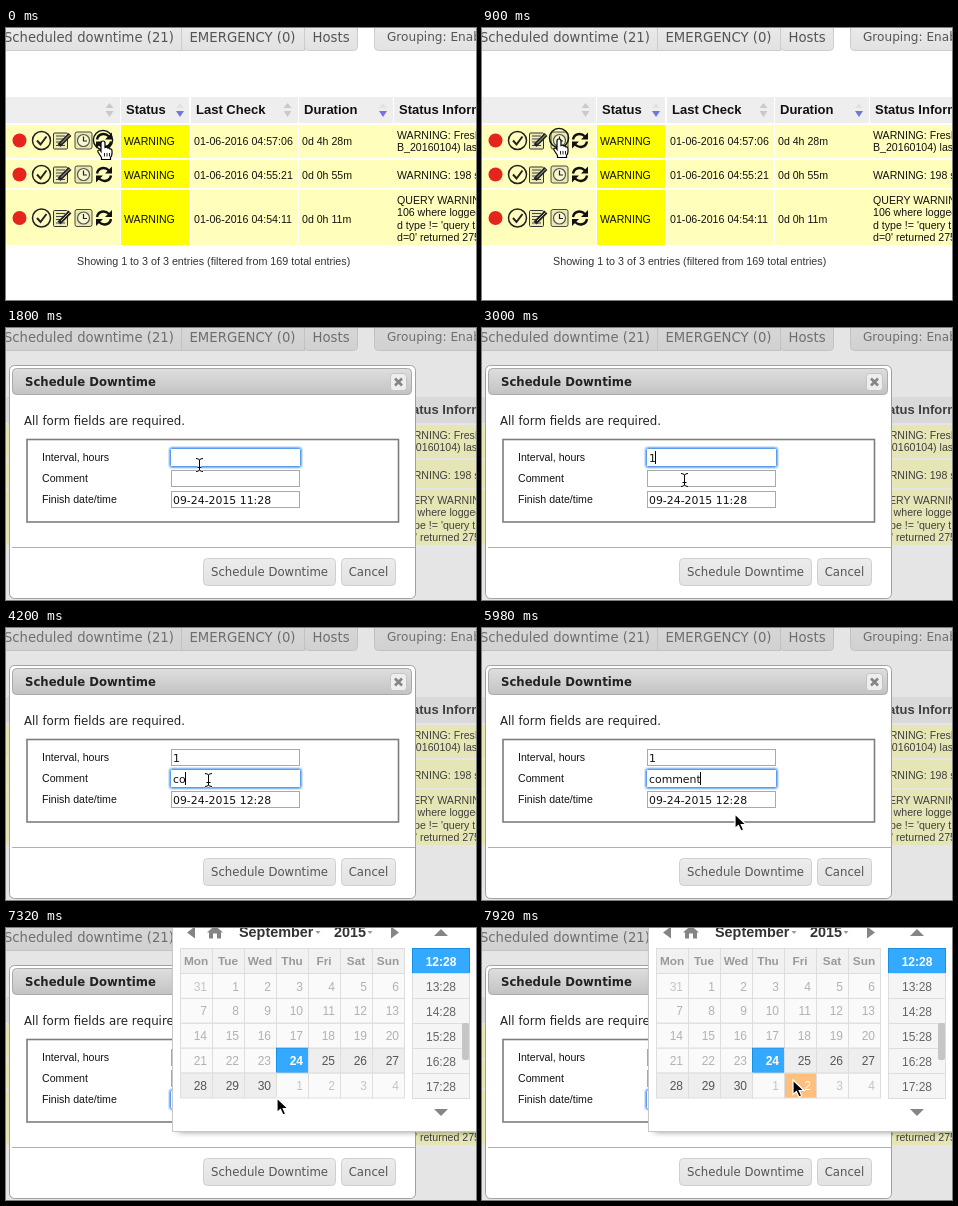
Animation of 470 by 272 pixels, one loop 8 s. Source, as an HTML page:

```html
<!DOCTYPE html>
<html lang="en">
<head>
<meta charset="utf-8">
<title>Schedule downtime</title>
<style>
html, body { margin: 0; width: 100%; height: 100%; overflow: hidden; background: #fff; }
svg { display: block; width: 470px; height: 272px; }
text { white-space: pre; }
.v { font-family: "DejaVu Sans", Verdana, sans-serif; }
.a { font-family: "Liberation Sans", Arial, sans-serif; }
.b { font-weight: bold; }
</style>
</head>
<body>
<svg id="stage" viewBox="0 0 470 272" xmlns="http://www.w3.org/2000/svg"></svg>
<script>
const LOOP = 8000;
const stage = document.getElementById('stage');

const rect = (x, y, w, h, fill, more = '') =>
  `<rect x="${x}" y="${y}" width="${w}" height="${h}" fill="${fill}" ${more}/>`;
const box = (x, y, w, h, fill, line, r = 0) =>
  rect(x + .5, y + .5, w - 1, h - 1, fill, `stroke="${line}" rx="${r}"`);
const path = (d, fill, more = '') => `<path d="${d}" fill="${fill}" ${more}/>`;
const text = (x, y, s, size, cls = 'a', fill = '#111', more = '') =>
  `<text x="${x}" y="${y}" font-size="${size}" class="${cls}" fill="${fill}" ${more}>${s}</text>`;
const group = (id, body, more = '') => `<g id="${id}" ${more}>${body}</g>`;
const at = (x, y, body) => `<g transform="translate(${x} ${y})">${body}</g>`;
const line = (d, w = 1, color = '#222') => path(d, 'none', `stroke="${color}" stroke-width="${w}"`);

const defs = `<defs>
  <linearGradient id="tab" x2="0" y2="1"><stop stop-color="#ececec"/><stop offset="1" stop-color="#e2e2e2"/></linearGradient>
  <linearGradient id="bar" x2="0" y2="1"><stop stop-color="#dedede"/><stop offset="1" stop-color="#c3c3c3"/></linearGradient>
  <filter id="blur" x="-10%" y="-10%" width="120%" height="120%"><feGaussianBlur stdDeviation="3.5"/></filter>
</defs>`;

// Page

function tabs() {
  const tab = (x, w, r) => box(x, -10, w, 33, 'url(#tab)', '#cdcdcd', r);
  return tab(-10, 186, 0) + tab(298, 54, 4) + tab(175, 124, 0) + tab(368, 130, 4) +
    text(-2, 14, 'Scheduled downtime (21)', 13.2, 'v', '#555') +
    text(183.5, 14, 'EMERGENCY (0)', 13.25, 'v', '#555') +
    text(306.5, 14, 'Hosts', 13.25, 'v', '#555') +
    text(381, 13, 'Grouping: Enabled', 12.1, 'v', '#555');
}

function sorter(x, y, active) {
  return path(`M${x - 4} ${y - 2}h8l-4 -5z`, active ? '#e2e2e2' : '#c9c9c9') +
    path(`M${x - 4} ${y + 1}h8l-4 6z`, active ? '#7474e0' : '#c9c9c9');
}

const arrows = (() => {
  const half = line('M-7 -1C-6 -7 1 -8 5 -4', 2.4, '#111') + path('M8 -8V-1H1z', '#111');
  return half + `<g transform="rotate(180)">${half}</g>`;
})();

function icons(y) {
  const check = `<circle r="9" fill="none" stroke="#222" stroke-width="1.5"/>` + line('M-4.5 0L-1 4L5 -4', 2);
  const note = box(-9, -8, 15, 17, '#eeeeb4', '#333', 1) +
    line('M-6 -4.5H3M-6 -1.5H2M-6 1.5H0M-6 5H3', 1.2, '#444') +
    line('M-3 5L8 -6', 4) + line('M-1 3L7.5 -5.5', 1, '#bbb');
  const clock = box(-9, -9, 18, 18, '#e9e9b4', '#4a4a40', 2) +
    `<circle r="6" fill="#f8f8d2" stroke="#55554a" stroke-width="1.2"/>` + line('M0 -4V.5H3.5', 1.2);
  return at(13.5, y, '<circle r="7" fill="#e3251d"/>') + at(35.5, y, check) +
    at(56, y, note) + at(77.5, y, clock) + at(98, y, arrows);
}

const cols = [[-2, 116], [115, 68], [185, 107], [293, 94], [388, 84]];
const rows = [
  { y: 97, h: 33, mid: 112.5, when: '01-06-2016 04:57:06', span: '0d 4h 28m',
    info: ['WARNING: Fresh', 'B_20160104) last'] },
  { y: 132, h: 28, mid: 146.5, when: '01-06-2016 04:55:21', span: '0d 0h 55m',
    info: ['WARNING: 198 s'] },
  { y: 162, h: 55, mid: 190, when: '01-06-2016 04:54:11', span: '0d 0h 11m',
    info: ['QUERY WARNING', '106 where logged', "d type != 'query t", "d=0' returned 275"] }
];

function table() {
  let out = cols.map(([x, w]) => rect(x, 69, w, 26, '#eeeeee')).join('');
  [['Status', 120], ['Last Check', 190], ['Duration', 298], ['Status Information', 393]]
    .forEach(([s, x]) => out += text(x, 86, s, 13, 'a b'));
  out += sorter(103.5, 82) + sorter(174, 82, true) + sorter(281.5, 82) + sorter(377, 82, true);
  for (const r of rows) {
    cols.forEach(([x, w], i) => out += rect(x, r.y, w, r.h, i === 1 ? '#ffff00' : '#ffffbb'));
    const base = r.mid + 4.5;
    out += icons(r.mid) + text(118, base, 'WARNING', 10.6) +
      text(188, base, r.when, 10.65) + text(296, base, r.span, 10.6);
    r.info.forEach((s, i) =>
      out += text(391, base + (i - (r.info.length - 1) / 2) * 12.2, s, 10.6));
  }
  return out + text(71, 237, 'Showing 1 to 3 of 3 entries (filtered from 169 total entries)', 10.74, 'a', '#333');
}

// Dialog

const fieldY = [121, 142, 163];

function glow() {
  return ['#d5e6fc', '#8fbdf6', '#5a9df0'].map((c, i) =>
    rect(162.5 + i, i - 2.5, 134 - 2 * i, 22 - 2 * i, '#fff', `stroke="${c}" rx="${3 - i}"`)).join('');
}

function dialog() {
  const button = (x, w, s) => box(x, 230, w, 28, 'url(#tab)', '#cfcfcf', 4) +
    text(x + w / 2, 248, s, 11.7, 'v', '#555', 'text-anchor="middle"');
  const labels = ['Interval, hours', 'Comment', 'Finish date/time'];
  return box(3, 37, 407, 234, '#fff', '#a0a0a0', 5) +
    box(6, 40, 400, 27, 'url(#bar)', '#aaa', 4) +
    text(19, 58, 'Schedule Downtime', 11.7, 'v b', '#222') +
    box(384, 45, 17, 18, '#eeeeee', '#c4c4c4', 3) +
    line('M389 50.5L396 57.5M396 50.5L389 57.5', 2.6, '#858585') +
    text(18, 97, 'All form fields are required.', 11.8, 'v', '#222') +
    rect(21, 111.5, 371.5, 82.5, 'none', 'stroke="#7d7d7d" stroke-width="1.6"') +
    labels.map((s, i) => text(36, fieldY[i] + 12, s, 10.6)).join('') +
    fieldY.map(y => box(165, y, 129, 17, '#fff', '#a9a9a9')).join('') +
    group('ring', glow()) +
    fieldY.map((y, i) => `<text id="in${i}" x="167" y="${y + 13}" font-size="10.9" class="v" fill="#111"></text>`).join('') +
    '<rect id="caret" width="1" height="13" fill="#000"/>' +
    line('M6 219.5H409', 1, '#b0b0b0') +
    button(197, 133, 'Schedule Downtime') + button(335, 55, 'Cancel');
}

// Date picker

const CELL = 32, ROW = 24.9, LEFT = 174, TOP = 45.5;

function picker() {
  let out = rect(172, -20, 310, 223, '#000', 'filter="url(#blur)" opacity=".55"') +
    box(166, -10, 320, 214, '#fff', '#c8c8c8') +
    path('M181 4.5l8 -6v12z', '#858585') + path('M385 -1.5v12l8 -6z', '#858585') +
    path('M201 4.5l8 -7 8 7h-2v6h-4v-5h-4v5h-4v-6z', '#858585') +
    text(233, 9, 'September', 14.4, 'a b', '#333') + path('M309.5 3h5l-2.5 3z', '#999') +
    text(328, 9, '2015', 14.4, 'a b', '#333') + path('M361.5 3h5l-2.5 3z', '#999');
  'Mon Tue Wed Thu Fri Sat Sun'.split(' ').forEach((s, i) => {
    out += rect(LEFT + i * CELL + .5, 20.5, CELL, 25, '#f1f1f1', 'stroke="#ddd"') +
      text(LEFT + (i + .5) * CELL, 37, s, 11.8, 'a b', '#999', 'text-anchor="middle"');
  });
  for (let i = 0; i < 35; i++) {
    const x = LEFT + i % 7 * CELL, y = TOP + Math.floor(i / 7) * ROW;
    const day = i === 0 ? 31 : i > 30 ? i - 30 : i;
    const now = i === 24, live = i > 24 && i <= 30;
    const ink = now ? '#fff' : live ? '#555' : i === 0 || i > 30 ? '#c4c4c4' : '#b2b2b2';
    out += rect(x + .5, y, CELL, ROW, now ? '#33aaff' : live ? '#eeeeee' : '#fafafa',
      `stroke="${now ? '#178fe5' : '#ddd'}" id="bg${i}"`) +
      text(x + 27, y + 17, day, 12, now ? 'a b' : 'a', ink, `text-anchor="end" id="day${i}"`);
  }
  out += path('M428 8l7 -7 7 7z', '#858585') + path('M428 181l7 7 7 -7z', '#858585');
  for (let i = 0; i < 6; i++) {
    const y = 20.5 + i * 25;
    out += rect(406.5, y, 57, 25, i ? '#f5f5f5' : '#33aaff', `stroke="${i ? '#ddd' : '#178fe5'}"`) +
      text(435, y + 17, `${12 + i}:28`, 12, i ? 'a' : 'a b', i ? '#666' : '#fff', 'text-anchor="middle"');
  }
  return out + rect(456, 95, 7, 37, '#c6c6c6', 'rx="2"');
}

// Pointers, each drawn with its hot spot at the origin

const beam = 'M-3 -6.5Q.5 -6.5 .5 -4.5Q.5 -6.5 4 -6.5M.5 -5V5M-3 6.5Q.5 6.5 .5 4.5Q.5 6.5 4 6.5M-1.5 2.5H2.5';
const pointers =
  group('press', '<circle r="9.6" fill="none" stroke="#111" stroke-width="1.4"/>') +
  group('arrow', path('M0 0V14.5L3.4 11.5L6 17L8.6 15.8L6.2 10.5H11z', '#000', 'stroke="#fff" stroke-width="1.2"')) +
  group('hand', at(0, 1.5, path('M-2 1.5Q-2 -.5 0 -.5Q2 -.5 2 1.5V6Q3.5 5 4.7 6.5Q6.2 6 7 7.5Q9 7.2 9 9.5V12Q9 14 7.5 16V18H-1.5V16Q-3.5 13 -5 10.5Q-5.5 8.5 -4 8.5Q-3 8.5 -2 10z',
    '#fff', 'stroke="#000" stroke-width="1.2"') + line('M1.5 11.5V15M4 11.5V15M6.5 11.5V15', 1))) +
  group('beam', line(beam, 2, '#fff') + line(beam, 1, '#000'));

stage.innerHTML = defs + rect(0, 0, 470, 272, '#fff') + tabs() + table() +
  group('modal', rect(0, 0, 470, 272, '#aaa', 'opacity=".3"') + dialog()) +
  group('picker', picker()) + pointers;

const $ = id => document.getElementById(id);
const show = (id, on) => $(id).setAttribute('display', on ? 'inline' : 'none');
const move = (id, x, y) => $(id).setAttribute('transform', `translate(${x} ${y})`);
const latest = (list, t) => list.filter(k => k[0] <= t).pop();

function glide(start, steps, from, to, via) {
  const mid = via || [(from[0] + to[0]) / 2, (from[1] + to[1]) / 2];
  return Array.from({ length: steps }, (_, i) => {
    const p = (i + 1) / steps, e = p * p * (3 - 2 * p), q = 1 - e;
    const spot = k => Math.round(q * q * from[k] + 2 * q * e * mid[k] + e * e * to[k]);
    return [start + i * 150, spot(0), spot(1)];
  });
}

const OPEN = 1050, PICK = 7320;
const track = [
  [0, 97, 112],
  ...glide(150, 4, [97, 112], [77, 110]),
  ...glide(1500, 3, [77, 110], [193, 137]),
  [2850, 205, 148], [3000, 202, 152],
  ...glide(5530, 4, [202, 152], [253, 186], [232, 146]),
  ...glide(6430, 3, [253, 186], [271, 170]),
  ...glide(7470, 4, [271, 170], [311, 152])
];
const presses = [[0, 1], [150, 0], [900, 1], [OPEN, 0], [3300, 1], [3450, 0], [6870, 1], [7170, 0]];
const focus = [[0, -1], [OPEN, 0], [3300, 1], [6870, -1], [PICK, 2]];
const typed = [
  [[0, ''], [2850, '1']],
  [[0, ''], [4050, 'c'], [4200, 'co'], [4490, 'com'], [4640, 'comm'], [4780, 'comme'], [4930, 'comment']],
  [[0, ''], [1200, '09-24-2015 11:28'], [3450, '09-24-2015 12:28']]
];
const blink = [[0, 0], [OPEN, 1], [1500, 0], [2100, 1], [2550, 0], [2850, 1],
  [3750, 0], [4050, 1], [5380, 0], [5830, 1], [6280, 0], [6720, 1]];

function pointer(t, x, y) {
  if (t < OPEN) return 'hand';
  const inside = x > 165 && x < 294 && fieldY.some(top => y >= top && y < top + 17);
  return inside && t < PICK ? 'beam' : 'arrow';
}

let lit = -1;
function hover(i) {
  if (i === lit) return;
  const paint = (n, bg, ink) => {
    $('bg' + n).setAttribute('fill', bg);
    $('day' + n).setAttribute('fill', ink);
  };
  if (lit > 30) paint(lit, '#fafafa', '#c4c4c4');
  if (i > 30) paint(i, '#ffbf7d', '#fff');
  lit = i;
}

function draw(t) {
  const [, x, y] = latest(track, t);
  const kind = pointer(t, x, y);
  for (const id of ['arrow', 'hand', 'beam']) show(id, id === kind);
  move(kind, x, y);
  show('press', latest(presses, t)[1]);
  move('press', x, y);

  show('modal', t >= OPEN);
  show('picker', t >= PICK);

  typed.forEach((list, i) => { $('in' + i).textContent = latest(list, t)[1]; });
  const f = latest(focus, t)[1];
  show('ring', f >= 0);
  show('caret', f >= 0 && latest(blink, t)[1]);
  if (f >= 0) {
    move('ring', 0, fieldY[f]);
    const input = $('in' + f);
    const w = input.textContent ? input.getComputedTextLength() : 0;
    move('caret', 167 + Math.floor(w), fieldY[f] + 2);
  }

  const col = Math.floor((x - LEFT) / CELL), row = Math.floor((y - TOP) / ROW);
  hover(t >= PICK && row < 5 ? row * 7 + col : -1);
}

const begin = performance.now();
function tick() {
  draw((performance.now() - begin) % LOOP);
  requestAnimationFrame(tick);
}
tick();
</script>
</body>
</html>
```
